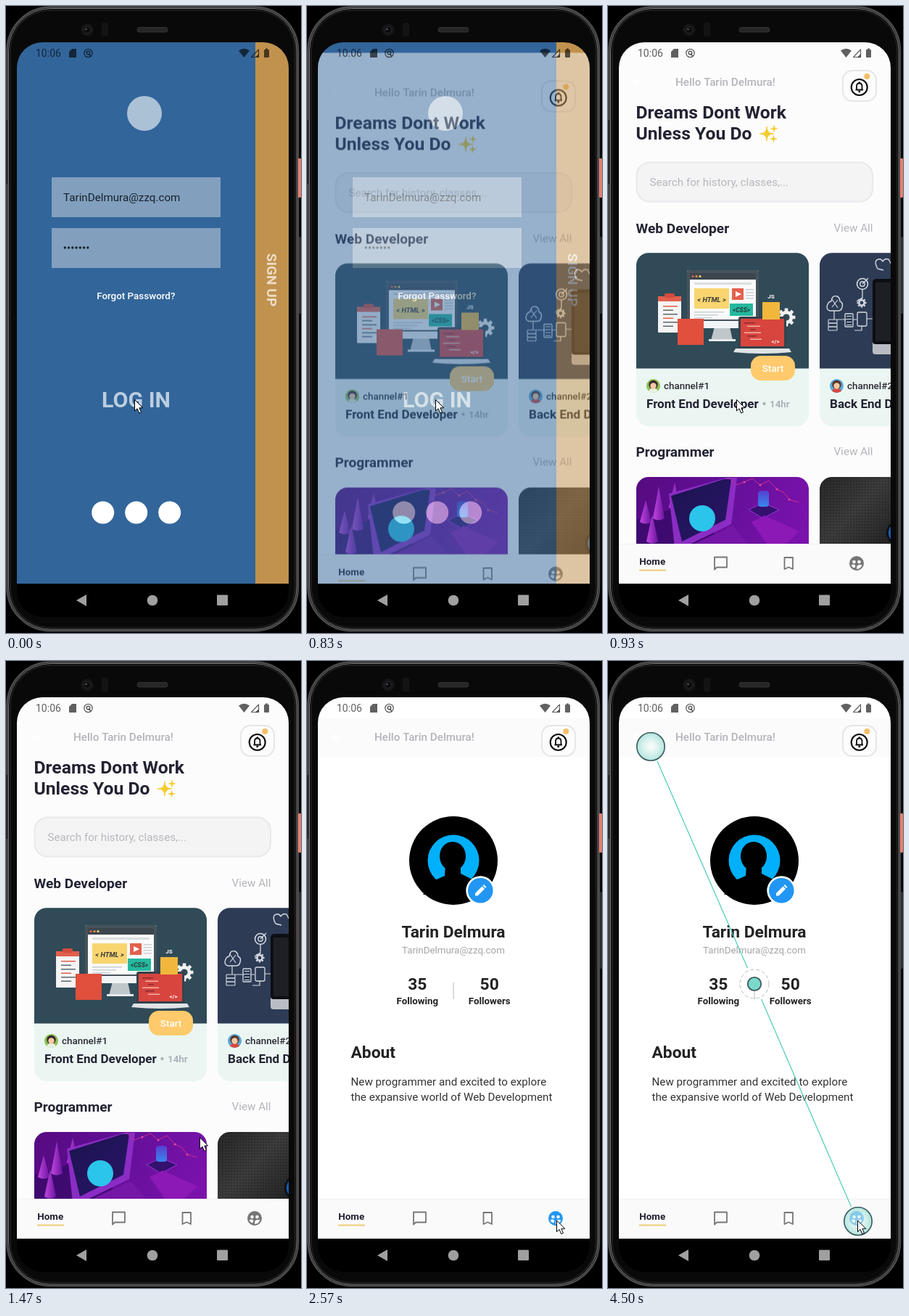
These frames come from a looping animation (407 px wide and 864 px high, 5.23 s). An HTML page with a canvas:

```html
<!DOCTYPE html>
<html lang="en">
<head>
<meta charset="utf-8">
<title>Learning app</title>
<style>
html, body { margin: 0; width: 100%; height: 100%; overflow: hidden; background: #000; }
canvas { display: block; width: 407px; height: 864px; }
</style>
</head>
<body>
<canvas id="stage"></canvas>
<script>
const W = 407, H = 864, LOOP = 5230;
const NAME = 'Tarin Delmura', MAIL = 'TarinDelmura@zzq.com';
const INK = '#222232', GREY = '#b3b5ba';
const dpr = window.devicePixelRatio || 1;
let g;

function surface(canvas) {
  canvas.width = W * dpr;
  canvas.height = H * dpr;
  const ctx = canvas.getContext('2d');
  ctx.scale(dpr, dpr);
  return ctx;
}

function layer(draw) {
  const canvas = document.createElement('canvas');
  g = surface(canvas);
  draw();
  return canvas;
}

// ---- drawing helpers ----
function text(s, x, y, size, color, weight = 400, align = 'left') {
  g.font = `${weight} ${size}px Roboto, "Noto Sans", sans-serif`;
  g.textAlign = align;
  g.fillStyle = color;
  g.fillText(s, x, y);
}

function paint(fill, stroke, lw = 1) {
  if (fill) { g.fillStyle = fill; g.fill(); }
  if (stroke) { g.strokeStyle = stroke; g.lineWidth = lw; g.stroke(); }
}

function box(x1, y1, x2, y2, fill, r = 0, stroke, lw) {
  g.beginPath();
  g.roundRect(x1, y1, x2 - x1, y2 - y1, r);
  paint(fill, stroke, lw);
}

function disc(x, y, r, fill, stroke, lw) {
  g.beginPath();
  g.arc(x, y, r, 0, 7);
  paint(fill, stroke, lw);
}

function shape(d, fill, stroke, lw, x = 0, y = 0) {
  const p = new Path2D(d);
  g.save();
  g.translate(x, y);
  g.lineJoin = 'round';
  if (fill) { g.fillStyle = fill; g.fill(p); }
  if (stroke) { g.strokeStyle = stroke; g.lineWidth = lw || 1; g.stroke(p); }
  g.restore();
}

function clipped(x1, y1, x2, y2, r, draw) {
  g.save();
  g.beginPath();
  g.roundRect(x1, y1, x2 - x1, y2 - y1, r);
  g.clip();
  draw();
  g.restore();
}

function sparkle(x, y, r) {
  g.beginPath();
  for (let i = 0; i < 4; i++) {
    const b = (i + 1) * Math.PI / 2;
    if (!i) g.moveTo(x + r, y);
    g.quadraticCurveTo(x, y, x + r * Math.cos(b), y + r * Math.sin(b));
  }
  paint('#f4ca2c', '#f4ca2c', .8);
}

function gear(x, y, r, color) {
  disc(x, y, r * .6, null, color, r * .4);
  for (let i = 0; i < 8; i++) {
    g.save();
    g.translate(x, y);
    g.rotate(i * Math.PI / 4);
    box(r * .7, -r * .2, r * 1.08, r * .2, color);
    g.restore();
  }
}

function ramp(x1, y1, x2, y2, ...colors) {
  const grad = g.createLinearGradient(x1, y1, x2, y2);
  colors.forEach((c, i) => grad.addColorStop(i / (colors.length - 1), c));
  return grad;
}

// ---- phone body ----
function phone() {
  box(0, 0, W, H, '#000');
  box(402, 318, 407, 424, '#2b2b2c', 1);
  box(1.5, 1.5, 403, 861, '#070707', 60, '#4c4c4d', 2.5);
  box(3.5, 3.5, 401, 859, null, 58, '#7a7a7b', 1);
  box(6, 6, 398.5, 856.5, '#090909', 55, '#1c1c1c', 2);
  box(0, 157, 2, 245, '#242424');
  box(403, 210, 407, 264, '#e3806f', 1);
  disc(112, 33, 8.5, '#161617');
  disc(112, 33, 4.5, '#0a0a0c', '#29292c', 1);
  disc(110.5, 32, 1.3, '#58585e');
  box(132, 23, 141, 42, '#131313', 2);
  box(181, 29.5, 223, 36, '#262627', 3, '#333', 1);
  box(15, 700, 390, 842, '#000', 36);
  shape('M97 819L111 811V827Z', '#a0a0a0');
  disc(202, 819, 7.3, '#a0a0a0');
  box(291, 811.5, 306, 826, '#a0a0a0', 1);
}

function statusBar() {
  const c = 'rgba(0,0,0,.62)';
  text('10:06', 41, 70, 14, c);
  shape('M91 59H97V71H87V63Z', c);
  disc(113.5, 65, 5.7, null, c, 1.3);
  disc(113.5, 64.5, 2.3, null, c, 1.5);
  shape('M114 66L117 69', null, c, 1.6);
  shape('M321 61.500Q328.500 56 336 61.500L328.500 71Z', c);
  shape('M348.500 60V70.500H338.500Z', null, c, 1.2);
  shape('M348.500 66V70.500H344Z', c);
  box(356, 60, 363, 71, c, 1);
  box(358, 58.5, 361, 60, c);
}

// ---- login ----
function login() {
  box(15, 50, 390, 796, '#32659a');
  box(344, 50, 390, 796, '#c1914e');
  disc(191, 148, 24, '#abc1d6');
  for (const y of [236, 306]) box(63, y, 296, y + 55, '#82a0be');
  text(MAIL, 79, 269, 15.2, '#17212c');
  for (let i = 0; i < 7; i++) disc(81.3 + i * 5.25, 333, 1.7, '#17212c');
  text('Forgot Password?', 179.3, 404, 13.4, '#fff', 500, 'center');
  text('LOG IN', 179.5, 553, 30.4, '#bccddf', 700, 'center');
  for (let i = 0; i < 3; i++) disc(133.7 + i * 46, 698, 15.5, '#fff');
  g.save();
  g.translate(360.3, 377.5);
  g.rotate(Math.PI / 2);
  text('SIGN UP', 0, 0, 19.1, '#ecdcc5', 700, 'center');
  g.restore();
}

// ---- shared header and navigation ----
function header() {
  shape('M49 105H36M42 99L36 105L42 111', null, '#fff', 2);
  text(`Hello ${NAME}!`, 93, 110, 15.2, GREY, 500);
  box(324, 89, 370, 131, '#fcfcfd', 13, '#e5e6e9', 2);
  disc(346.7, 112, 11, null, '#0c0c0c', 2.1);
  shape('M341.500 115.500H352M343 115V110.500Q343 106.500 346.800 106.500Q350.500 106.500 350.500 110.500V115', null, '#0c0c0c', 1.8);
  disc(346.8, 117.8, 1.5, '#0c0c0c');
  disc(346.8, 105.5, 1.3, '#0c0c0c');
  disc(357.3, 97, 4, '#f4bf68');
}

function nav(active) {
  const c = '#767676', p = active ? '#2196f3' : c;
  box(15, 741.5, 390, 796, '#fafafa');
  box(15, 741, 390, 742, '#f1f1f1');
  text('Home', 61.2, 770, 13.4, INK, 700, 'center');
  box(43, 776.5, 80, 778.5, '#efcb78');
  shape('M147 759.500H164V773.500H150L147 776.500Z', null, c, 1.8);
  shape('M243.500 760H255V776L249.200 773.300L243.500 776Z', null, c, 1.8);
  disc(343, 768, 10, p);
  disc(339.5, 766, 2.3, '#fafafa');
  disc(346.5, 766, 2.3, '#fafafa');
  shape('M335.500 770.500Q339 768.500 341.500 771L340.500 774.500Q337 774 335.500 770.500Z', '#fafafa');
  shape('M350.500 770.500Q346.500 768.500 343.500 771.500L343 776Q348.500 775.500 350.500 770.500Z', '#fafafa');
}

// ---- course pictures ----
function webArt() {
  box(39, 340, 277, 500, '#304a57');
  box(69, 400, 101, 450, '#f4f4f4', 1);
  box(69, 400, 101, 407, '#e35f4d', 1);
  box(78, 396, 92, 402, '#d24c3d', 2);
  for (let i = 0; i < 6; i++) box(76, 413 + i * 5.5, i % 2 ? 90 : 96, 414.5 + i * 5.5, i % 3 ? '#5b6a72' : '#e35f4d');
  shape('M147 442H168L172 461H142Z', '#bfc7cb');
  box(139, 459, 176, 462, '#e6eaec');
  box(109, 364, 208, 444, '#f1f4f5', 3);
  box(109, 364, 208, 434, '#46535c', 3);
  box(113, 368, 204, 432, '#fafafa');
  box(113, 368, 204, 377, '#3c464e');
  ['#e35f4d', '#f2914a', '#f9d56e'].forEach((c, i) => disc(117 + i * 5, 372.5, 1.6, c));
  box(119, 381, 198, 384, '#d9dee0');
  box(119, 389, 167, 417, '#f9d570');
  text('< HTML >', 143, 407.5, 9.5, '#3a3a38', 'italic 700', 'center');
  box(171, 389, 187, 405, '#e2624d');
  shape('M176 393L184 397L176 401Z', '#fff');
  for (let i = 0; i < 4; i++) box(190, 390 + i * 4, 201, 391.5 + i * 4, '#c9d0d3');
  for (let i = 0; i < 3; i++) box(119, 421 + i * 4, 160 - i * 8, 422.5 + i * 4, '#c9d0d3');
  box(168, 410, 200, 427, '#25b89e');
  text('<CSS>', 184, 421.5, 8.5, '#253a3a', 'italic 700', 'center');
  gear(246, 429, 11.5, '#f1f1f1');
  box(180, 428, 246, 472, '#34424b', 3);
  box(183, 431, 243, 469, '#d8453f');
  for (let i = 0; i < 6; i++) {
    box(188 + (i % 3) * 4, 436 + i * 4.5, 203 + (i * 7) % 13, 437.4 + i * 4.5, i % 2 ? '#f2b3a6' : '#8c2b31');
  }
  text('</>', 231, 465, 8, '#fff', 700, 'center');
  shape('M176 472H250L253 477Q213 481 173 477Z', '#dfe4e6');
  box(96, 431, 132, 467, '#e0503c');
  box(213, 408, 237, 432, '#f0b73c');
  text('JS', 225, 403, 8, '#fff', 700, 'center');
}

function serverArt() {
  const c = '#d5dae2';
  box(292, 340, 400, 500, '#2d3b55');
  shape('M372 362Q366 351 373 349Q377 348 379 352Q382 347 387 349L392 358M372 362L380 364', null, c, 1.4);
  disc(351, 383, 7.5, null, c, 1.6);
  disc(351, 383, 3.2, null, c, 1.4);
  shape('M351 383L359 375M351 391V402L343 407', null, c, 1.3);
  shape('M306 420Q300 418 303 411Q305 407 308 407Q309 398 316 400Q320 402 320 407Q325 409 323 415Q322 420 317 420Z', null, c, 1.4);
  shape('M309 404L317 416M317 405L309 415', null, c, 1.1);
  shape('M312 420V432M316 432H329M337 432H343', null, c, 1.2);
  for (let i = 0; i < 3; i++) box(304, 432 + i * 5, 316, 437 + i * 5, null, 1, c, 1.1);
  box(327, 424, 338, 442, null, 1, c, 1.3);
  for (let i = 0; i < 4; i++) box(329, 427 + i * 4, 336, 428 + i * 4, c);
  gear(350, 409, 6, c);
  box(344, 422, 357, 441, null, 2, c, 1.3);
  shape('M357 431H365M350 441V447H340', null, c, 1.2);
  box(365, 376, 400, 480, '#b9bdc3', 4);
  box(365, 376, 400, 466, '#0c0e13', 4);
  box(369, 381, 400, 462, '#1d1f25');
}

function codeArt() {
  box(39, 649, 277, 760, ramp(39, 649, 277, 742, '#560a80', '#64109a', '#7d12ae'));
  shape('M39 742V708L92 692L170 742Z', '#3f0a70');
  for (const [x, y, h] of [[52, 681, 30], [70, 662, 44], [92, 657, 34], [61, 700, 38]]) {
    shape(`M${x} ${y}L${x + 8} ${y + h}Q${x} ${y + h + 5} ${x - 8} ${y + h}Z`, ramp(x - 8, 0, x + 8, 0, '#c347e0', '#6a149f'));
  }
  shape('M84 672L164 650L178 650L170 714L104 746H92Z', '#8b2cc4');
  shape('M87 675L160 652H170L162 708L102 738Z', ramp(87, 660, 165, 735, '#1c1450', '#2a1468'));
  shape('M104 748L172 716L194 742V748Z', '#7416a6');
  disc(130, 706, 18, '#2bc4ea');
  shape('M194 694L214 685L236 694L214 706Z', '#34106f', '#9a36d8', 1);
  box(207, 668, 222, 690, ramp(0, 668, 0, 690, '#5540d0', '#3a86ee'), 4);
  shape('M198 711L216 702L264 724L245 742H220Z', '#8c18b6');
  shape('M166 650L177 660L188 656L199 651L210 660L222 654L233 666L242 670L250 680L263 684', null, '#d02b8d', 1);
  for (const [x, y] of [[188, 656], [210, 660], [233, 666], [250, 680]]) disc(x, y, 1.5, '#e24a9c');
}

function darkArt() {
  box(292, 649, 400, 760, ramp(292, 649, 390, 742, '#272728', '#3c3c3d', '#242425'));
  g.fillStyle = 'rgba(0,0,0,.2)';
  for (let y = 650; y < 742; y += 4) {
    for (let x = 292 + (y % 8 ? 2 : 0); x < 390; x += 4) g.fillRect(x, y, 2, 2);
  }
  disc(402, 726, 18, '#0f1216');
  disc(402, 726, 15, '#1d5fb4');
}

function person(x, y, back, hair, shirt) {
  clipped(x - 9.5, y - 9.5, x + 9.5, y + 9.5, 9.5, () => {
    disc(x, y, 10, back);
    disc(x, y - 1.5, 6.2, hair);
    disc(x, y + 10, 7, shirt);
    disc(x, y, 4.2, '#f4c9a4');
  });
}

function card(x, art, channel, title) {
  box(x, 340.3, x + 238, 579, '#ebf6f2', 17);
  clipped(x, 340.3, x + 238, 499.5, [17, 17, 0, 0], art);
  text(channel, x + 38, 528, 13.4, '#2a2a35', 500);
  text(title, x + 14, 554, 17.1, INK, 700);
}

function home() {
  box(15, 50, 390, 796, '#fcfcfc');
  header();
  text('Dreams Dont Work', 38.5, 155, 24.7, INK, 700);
  text('Unless You Do', 38.5, 184, 24.7, INK, 700);
  sparkle(219, 176, 10);
  sparkle(229, 169, 4.5);
  sparkle(228.5, 183, 4.5);
  box(39.5, 215.5, 365, 269.5, '#f4f4f5', 18, '#e8e9eb', 2);
  text('Search for history, classes,...', 57.5, 248, 15.2, '#b6b8bc');
  [['Web Developer', 313], ['Programmer', 621]].forEach(([s, y]) => {
    text(s, 38.5, y, 19.1, INK, 700);
    text('View All', 365.5, y - 2, 15.2, GREY, 400, 'right');
  });
  card(39, webArt, 'channel#1', 'Front End Developer');
  person(62.5, 523.5, '#8cc152', '#3a2630', '#e8f0e0');
  disc(215.5, 548, 2.2, '#b0b4ba');
  text('14hr', 223, 553, 13.4, '#adb1b8', 700);
  box(197, 482, 258, 516, '#feca6c', 14);
  text('Start', 227.5, 504, 13.4, '#fff', 500, 'center');
  card(292, serverArt, 'channel#2', 'Back End Developer');
  person(315.5, 523.5, '#58a9d8', '#5a3328', '#d8483f');
  clipped(39, 649, 277, 760, [17, 17, 0, 0], codeArt);
  clipped(292, 649, 530, 760, [17, 17, 0, 0], darkArt);
  nav(false);
}

// ---- profile ----
function profile() {
  box(15, 50, 390, 796, '#fff');
  box(15, 79, 390, 132, '#fbfbfb');
  header();
  disc(202, 275, 61, '#000');
  disc(202, 275, 35.5, '#00b0fb');
  g.beginPath();
  g.ellipse(201, 269, 18, 20, 0, 0, 7);
  paint('#000');
  shape('M191 280H212V293L232 303L242 322H160L172 304L190 296Z', '#000');
  disc(239.3, 316.3, 20, '#fff');
  disc(239.3, 316.3, 17.3, '#2196f3');
  shape('M232 323.500V320L241.500 310.500L245 314L235.500 323.500ZM242.500 309.500L244 308L247.500 311.500L246 313Z', '#fff');
  text(NAME, 202, 381, 22.8, '#222', 700, 'center');
  text(MAIL, 202, 403, 13.35, '#a5a5a5', 400, 'center');
  [['35', 'Following', 152.3], ['50', 'Followers', 251.7]].forEach(([n, s, x]) => {
    text(n, x, 453, 22.8, '#222', 700, 'center');
    text(s, x, 473, 13.3, '#222', 700, 'center');
  });
  box(201.6, 443, 202.6, 466, '#b5b5b5');
  text('About', 60.5, 547, 22.8, '#222', 700);
  text('New programmer and excited to explore', 60.5, 585, 15.2, '#333');
  text('the expansive world of Web Development', 60.5, 606, 15.2, '#333');
  nav(true);
}

// ---- overlays ----
function touches() {
  const teal = '#43c8b6', rim = '#3c5a5e';
  shape('M68 138L192.500 423M211.500 466L335.500 752', null, teal, 1.1);
  for (const [x, y] of [[59, 118], [345, 772]]) {
    const grad = g.createRadialGradient(x, y, 2, x, y, 20);
    grad.addColorStop(0, 'rgba(240,250,248,.5)');
    grad.addColorStop(1, 'rgba(145,220,208,.75)');
    disc(x, y, 19.2, grad, rim, 1.6);
  }
  g.setLineDash([5, 3]);
  disc(202, 445, 20, null, '#b9bcbc', 1);
  g.setLineDash([]);
  disc(202, 445, 9.2, 'rgba(100,212,194,.85)', rim, 1.8);
}

function cursor([x, y]) {
  shape('M0 0V15.500L3.600 12.300L6.200 18.500L9 17.300L6.400 11.300H11.300Z', '#fff', '#000', 1, x, y);
}

// ---- timing ----
const lerp = (a, b, p) => a.map((v, i) => v + (b[i] - v) * p);
const steps = (t, t0, t1, n) => Math.min(1, Math.max(0, Math.floor((t - t0) / (t1 - t0) * n + 1e-6) / n));
const A = [177.5, 542.5], B = [329, 735], C = [344.5, 771];

function pointer(t) {
  if (t < 1200) return A;
  if (t < 1730) {
    const p = steps(t + 33, 1200, 1733, 16);
    return lerp(A, B, p * p * (3 - 2 * p));
  }
  const p = steps(t + 34, 1730, 2004, 8);
  return lerp(B, C, 1 - (1 - p) ** 1.7);
}

const base = layer(phone), loginPage = layer(login), homePage = layer(home), profilePage = layer(profile);
const stage = surface(document.getElementById('stage'));

function put(img, y = 0, alpha = 1) {
  g.globalAlpha = alpha;
  g.drawImage(img, 0, y, W, H);
  g.globalAlpha = 1;
}

function pages(t) {
  if (t < 930) put(loginPage);
  if (t >= 800 && t < 2430) {
    const left = 1 - steps(t, 800, 930, 4);
    put(homePage, 14.5 * left ** 3, 1 - .5 * left ** 1.4);
  }
  if (t >= 2430) {
    put(profilePage);
    const p = steps(t, 2430, 2570, 4);
    if (p < 1) disc(343, 768, 16 + 6 * p, `rgba(0,0,0,${.12 * (1 - p)})`);
  }
}

function render(t) {
  g = stage;
  put(base);
  clipped(15, 50, 390, 796, [35, 35, 0, 0], () => pages(t));
  statusBar();
  if (t >= 4500) touches();
  cursor(pointer(t));
}

const start = performance.now();
function tick() {
  render((performance.now() - start) % LOOP);
  requestAnimationFrame(tick);
}
tick();
</script>
</body>
</html>
```
